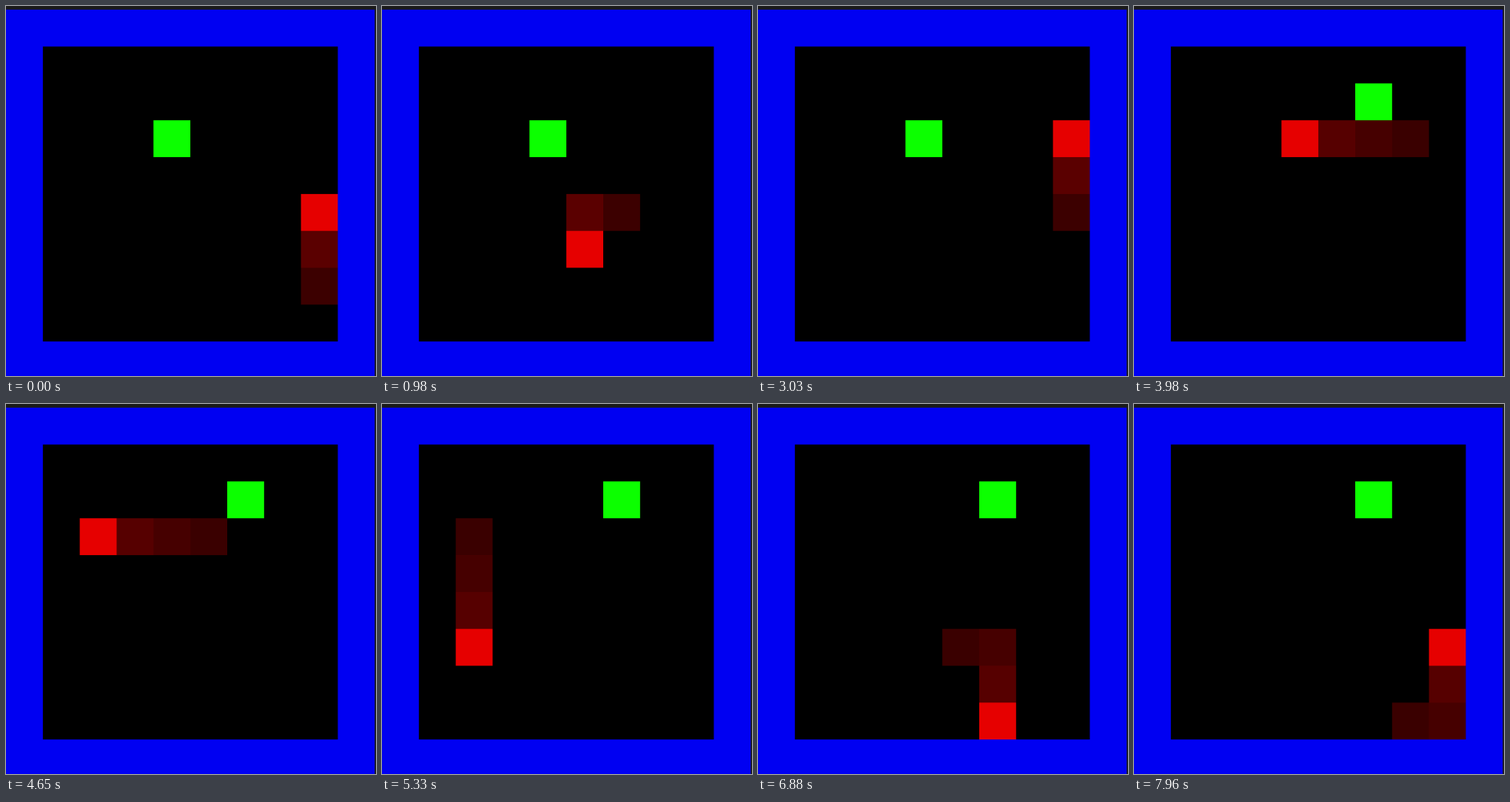
These frames come from a looping animation (480x480 px, 7990 ms). An HTML page with a canvas:

```html
<!DOCTYPE html>
<html lang="en">
<head>
<meta charset="utf-8">
<title>Snake</title>
<style>
  html, body { margin: 0; width: 100%; height: 100%; overflow: hidden; background: #000; }
  canvas { display: block; width: 480px; height: 480px; }
</style>
</head>
<body>
<canvas id="stage" width="480" height="480"></canvas>
<script>
const ctx = document.getElementById('stage').getContext('2d');

const LOOP = 7990;
const STEP = 256;    // ms per move
const PHASE = 130;   // time already spent in the first move
const MEAL = 16;     // move on which the food is eaten
const SIZE = 47.83;  // cell size; edges fall between pixels and are smoothed
const TOP = 4.75;
const MOVES = 'UU' + 'LLLDDRRRUUUULLLLLLDDDRRRRDDRRUU';
const DIRS = { U: [0, -1], D: [0, 1], L: [-1, 0], R: [1, 0] };
const SHORT = ['#e60000', '#5a0000', '#3c0000'];
const LONG = ['#e60000', '#560000', '#460000', '#3a0000'];

const path = [[8, 7]];
for (const m of MOVES) {
  const [x, y] = path[path.length - 1];
  path.push([x + DIRS[m][0], y + DIRS[m][1]]);
}

function block(i, j, n, color) {
  ctx.fillStyle = color;
  ctx.fillRect(SIZE * i, TOP + SIZE * j, SIZE * n, SIZE * n);
}

function draw(t) {
  const move = Math.min(Math.floor((t + PHASE) / STEP), path.length - 3);
  const fed = move >= MEAL;

  ctx.globalCompositeOperation = 'source-over';
  ctx.fillStyle = '#1a1a1a';
  ctx.fillRect(0, 0, 480, 480);
  block(0, 0, 10, '#0000f2');
  block(1, 1, 8, '#000');

  // Adding light keeps shared cell edges free of seams.
  ctx.globalCompositeOperation = 'lighter';
  const [fx, fy] = fed ? [6, 2] : [4, 3];
  block(fx, fy, 1, '#0cff00');
  (fed ? LONG : SHORT).forEach((color, k) => {
    const [x, y] = path[move + 2 - k];
    block(x, y, 1, color);
  });
}

const start = performance.now();
function tick() {
  draw((performance.now() - start) % LOOP);
  requestAnimationFrame(tick);
}
tick();
</script>
</body>
</html>
```
